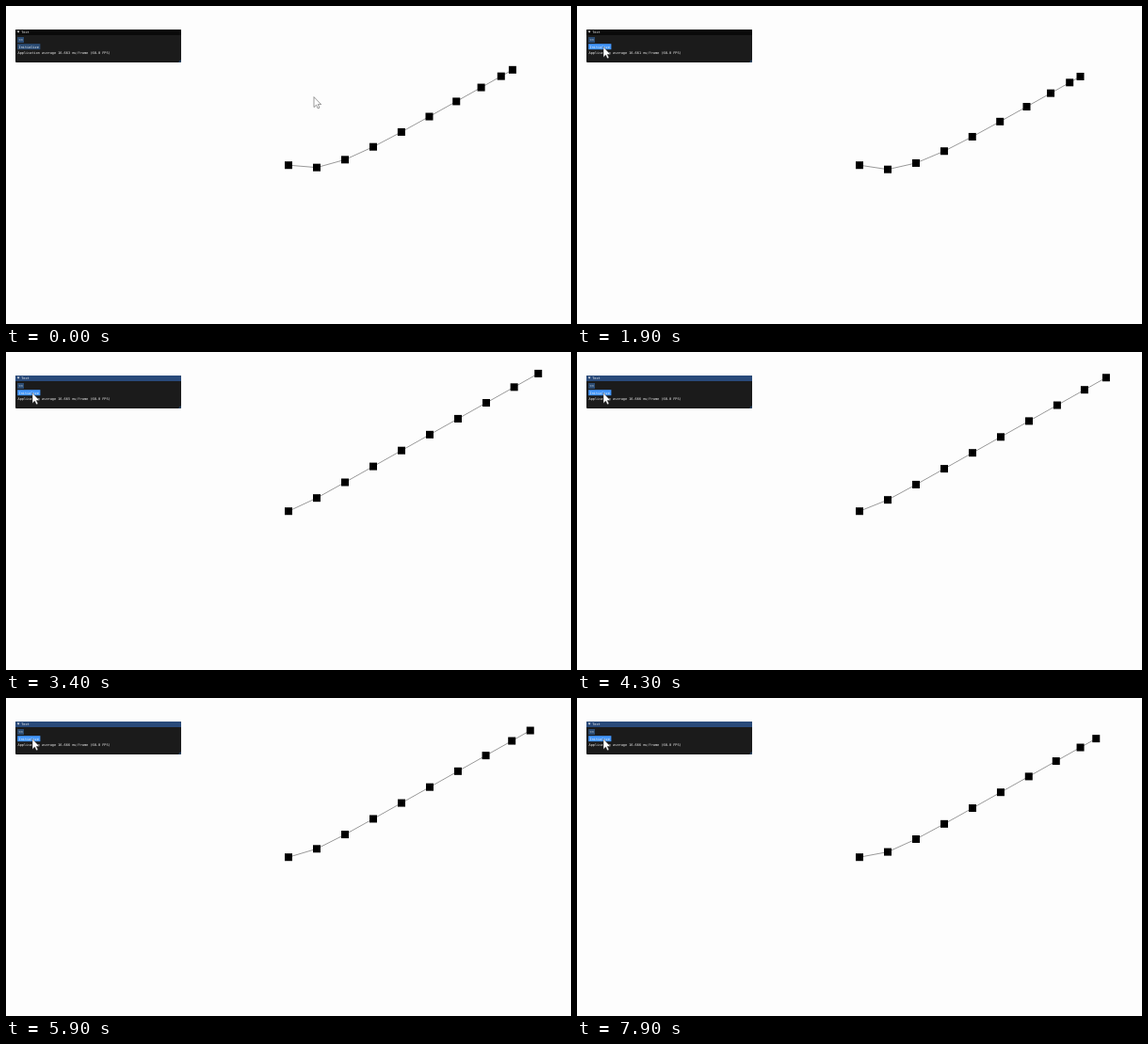
Write an HTML page that moves like this. It is 600 px wide and 338 px high and loops after 8000 ms.

```html
<!DOCTYPE html>
<html lang="en">
<head>
<meta charset="utf-8">
<style>
  html, body { margin: 0; width: 100%; height: 100%; overflow: hidden; background: #fdfdfd; }
  svg { display: block; width: 600px; height: 338px; }
  text { font: 3.55px "DejaVu Sans Mono", monospace; fill: #f2f2f2; white-space: pre; text-rendering: geometricPrecision; }
</style>
</head>
<body>
<svg viewBox="0 0 600 338">
  <polyline id="rope" fill="none" stroke="#000" stroke-width=".4"/>
  <g id="nodes"></g>
  <rect x="10" y="25" width="176" height="35" rx="1" fill="#1b1b1b"/>
  <path id="title" d="M10 31V26a1 1 0 0 1 1-1H185a1 1 0 0 1 1 1V31Z"/>
  <path d="M11.8 26.4h2.6l-1.3 2.3Z" fill="#f2f2f2"/>
  <path d="M185.7 57v2.7h-2.7Z" fill="#284a70"/>
  <rect x="12.2" y="33" width="6.8" height="6" fill="#2b4c74"/>
  <rect id="button" x="12.2" y="40.2" width="24.2" height="6"/>
  <text x="16.2" y="29">Text</text>
  <text x="13.5" y="37.2">&lt;&lt;</text>
  <text x="13.5" y="44.5">Initialize</text>
  <text id="stats" x="12.5" y="50.7"></text>
  <path id="cursor" d="M0 0V11L2.5 8.6 4.2 12.3 6 11.5 4.3 8H7.6Z" fill="#fff" stroke="#222" stroke-width=".45"/>
</svg>
<script>
const LOOP = 8000, RESET = 2270, FOCUS = 2170;
const COUNT = 10, START_AGE = 11.87;
const GRAVITY = 2.75, STIFFNESS = 0.152;
const $ = id => document.getElementById(id);

const squares = Array.from({ length: COUNT }, () => {
  const r = document.createElementNS("http://www.w3.org/2000/svg", "rect");
  r.setAttribute("width", 8);
  r.setAttribute("height", 8);
  $("nodes").append(r);
  return r;
});

const progress = (t, from, to) => Math.min(1, Math.max(0, (t - from) / (to - from)));
const bezier = (a, b, c, u) => (1 - u) ** 2 * a + 2 * u * (1 - u) * b + u * u * c;

// Overdamped chain of springs, pinned at its first node
function chainAt(age) {
  const steps = Math.max(1, Math.ceil(age / 0.05)), dt = age / steps;
  let p = Array.from({ length: COUNT }, (_, i) => [300 + 30 * i, 169.2 - 16.9 * i]);
  for (let s = 0; s < steps; s++) {
    p = p.map(([x, y], i) => {
      if (!i) return [x, y];
      const a = p[i - 1], b = p[i + 1] || [x, y];
      return [x + dt * STIFFNESS * (a[0] + b[0] - 2 * x),
              y + dt * (GRAVITY + STIFFNESS * (a[1] + b[1] - 2 * y))];
    });
  }
  return p;
}

// An arc to the panel, then a short slide onto the button
function cursorAt(t) {
  const u = progress(t, 200, 1100), slide = progress(t, 1250, 1500);
  return [bezier(327, 110, 40, u) - 12 * slide, bezier(96.6, 5, 44, u) - 0.5 * slide];
}

// The average dips briefly and recovers to 60 frames per second
const frameTime = t => 16.6664 - 0.0067 * Math.exp(-(((t - 1250) / 1650) ** 2));

function draw(t) {
  const points = chainAt(t < RESET ? START_AGE + t / 1000 : (t - RESET) / 1000);
  $("rope").setAttribute("points", points.join(" "));
  points.forEach(([x, y], i) => {
    squares[i].setAttribute("x", x - 4);
    squares[i].setAttribute("y", y - 4);
  });

  const [x, y] = cursorAt(t);
  $("cursor").setAttribute("transform", `translate(${x} ${y})`);
  const hover = x < 36.4 && y > 40 && y < 46;
  const pressed = t >= FOCUS && t < RESET;
  $("button").setAttribute("fill", pressed ? "#0f87fa" : hover ? "#4296fa" : "#2b4c74");
  $("title").setAttribute("fill", t >= FOCUS ? "#294a7a" : "#0a0a0a");
  $("stats").textContent = `Application average ${frameTime(t).toFixed(3)} ms/frame (60.0 FPS)`;
}

const origin = performance.now();
function tick() {
  draw((performance.now() - origin) % LOOP);
  requestAnimationFrame(tick);
}
tick();
</script>
</body>
</html>
```
